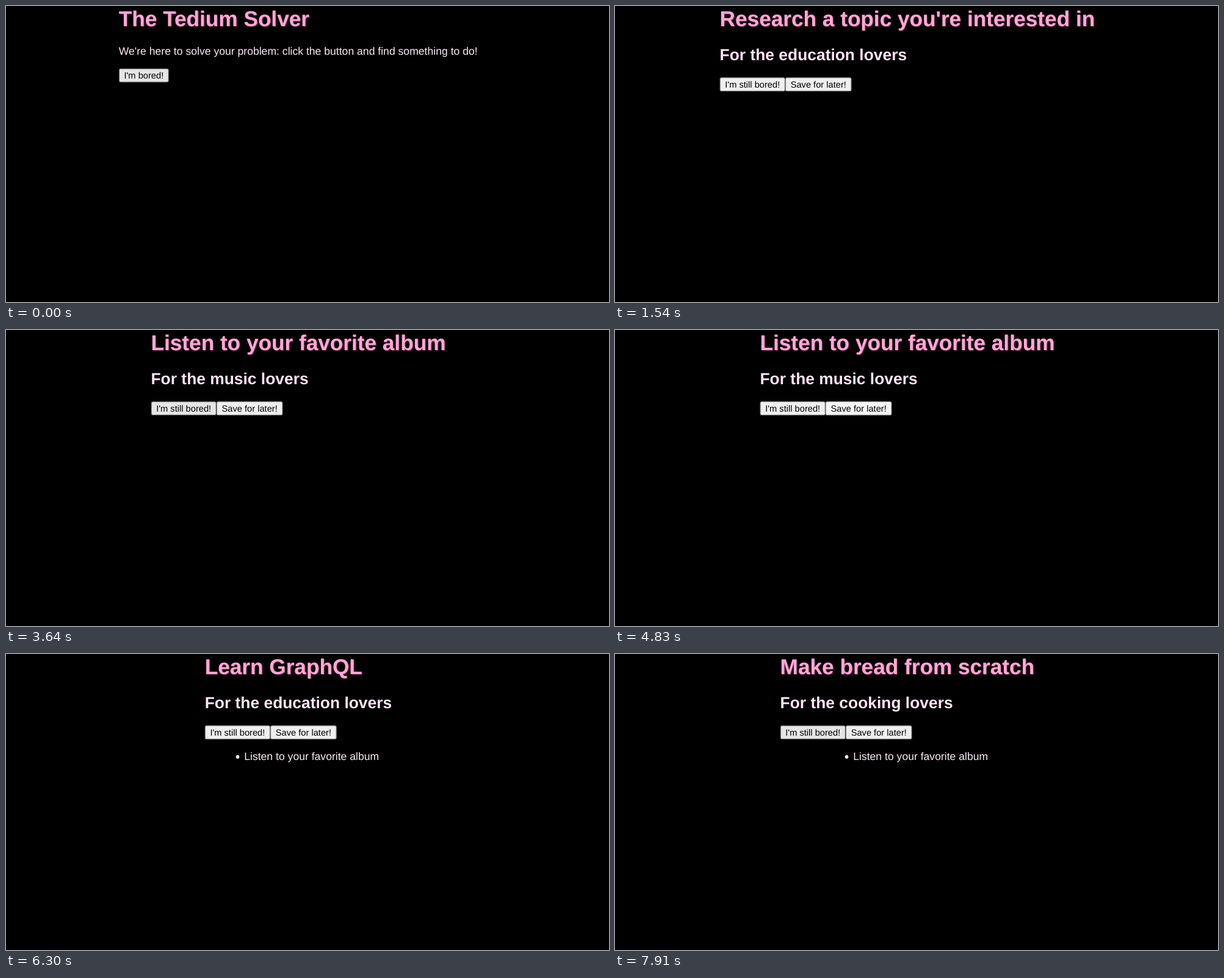
An HTML page that plays this animation: 988 by 486 pixels, repeating every 8 s.

```html
<!DOCTYPE html>
<html lang="en">
<head>
<meta charset="utf-8">
<title>Something to do</title>
<style>
  html, body { margin: 0; width: 100%; height: 100%; overflow: hidden; background: #000; }
  svg { display: block; width: 988px; height: 486px; }
  text { font-family: "Liberation Sans", Arial, sans-serif; text-rendering: geometricPrecision; white-space: pre; }
  .title { font-size: 35.2px; font-weight: bold; fill: #fea8d6; text-shadow: 1px 1px 2px #7a2a55; }
  .subtitle { font-size: 26.4px; font-weight: bold; fill: #ffe4f6; }
  .body { font-size: 17.6px; fill: #ffe9f8; }
  .label { font-size: 14.667px; fill: #000; }
  rect { stroke-width: 1.1px; }
  .normal rect { fill: #efefef; stroke: #767676; }
  .hover rect { fill: #e5e5e5; stroke: #4f4f4f; }
  .active rect { fill: #f5f5f5; stroke: #8d8d8d; }
  .disabled rect { fill: #686868; stroke: #6c6c6c; }
  .disabled .label { fill: #1c1c1c; }
</style>
</head>
<body>
<svg id="stage" viewBox="0 0 988 486"></svg>
<script>
const LOOP = 8000;
const stage = document.getElementById('stage');
const BORED = "I'm still bored!";
const LATER = 'Save for later!';

const screens = {
  home: { x: 184.8, title: 'The Tedium Solver', top: 102.4, buttons: ["I'm bored!"],
    body: "We're here to solve your problem: click the button and find something to do!" },
  research: { x: 171.6, title: "Research a topic you're interested in",
    subtitle: 'For the education lovers', buttons: [BORED, LATER] },
  album: { x: 237.5, title: 'Listen to your favorite album',
    subtitle: 'For the music lovers', buttons: [BORED, LATER] },
  saved: { x: 237.5, title: 'Listen to your favorite album',
    subtitle: 'For the music lovers', buttons: [BORED, 'Saved!'], list: true },
  learn: { x: 325.7, title: 'Learn GraphQL',
    subtitle: 'For the education lovers', buttons: [BORED, LATER], list: true },
  bread: { x: 270.6, title: 'Make bread from scratch',
    subtitle: 'For the cooking lovers', buttons: [BORED, LATER], list: true }
};

// start time, screen, state of each button
const steps = [
  [0, 'home', 'hover'],
  [1260, 'home', 'active'],
  [1400, 'research', 'normal', 'normal'],
  [2240, 'research', 'hover', 'normal'],
  [3430, 'research', 'active', 'normal'],
  [3570, 'album', 'hover', 'normal'],
  [4340, 'album', 'normal', 'hover'],
  [4830, 'album', 'normal', 'active'],
  [4970, 'saved', 'normal', 'disabled'],
  [5530, 'saved', 'hover', 'disabled'],
  [6090, 'saved', 'active', 'disabled'],
  [6230, 'learn', 'normal', 'normal'],
  [6860, 'learn', 'hover', 'normal'],
  [7700, 'learn', 'active', 'normal'],
  [7910, 'bread', 'hover', 'normal']
];

function add(parent, tag, attrs, content = '') {
  const node = document.createElementNS('http://www.w3.org/2000/svg', tag);
  for (const [key, value] of Object.entries(attrs)) node.setAttribute(key, value);
  node.textContent = content;
  return parent.appendChild(node);
}

function write(parent, style, x, y, content) {
  return add(parent, 'text', { class: style, x, y }, content);
}

function addButton(parent, x, top, label, state) {
  const group = add(parent, 'g', { class: state });
  const box = add(group, 'rect', { x: x + 0.55, y: top + 0.55, height: 22, rx: 2.2 });
  const text = write(group, 'label', x + 8.7, top + 16.8, label);
  const width = text.getComputedTextLength() + 17.4;
  box.setAttribute('width', width - 1.1);
  return x + width;
}

function show([, name, ...states]) {
  const { x, title, subtitle, body, top = 117.2, buttons, list } = screens[name];
  stage.replaceChildren();
  write(stage, 'title', x, 33.2, title);
  if (subtitle) write(stage, 'subtitle', x, 89, subtitle);
  if (body) write(stage, 'body', x, 80.3, body);
  let left = x;
  buttons.forEach((label, i) => { left = addButton(stage, left, top, label, states[i]); });
  if (list) {
    add(stage, 'circle', { class: 'body', cx: 379.6, cy: 168.9, r: 2.8 });
    write(stage, 'body', 390.2, 174.2, 'Listen to your favorite album');
  }
}

let shown;
const start = performance.now();

function tick() {
  const time = (performance.now() - start) % LOOP;
  const step = steps.findLast(([from]) => from <= time);
  if (step !== shown) show(shown = step);
  requestAnimationFrame(tick);
}
tick();
</script>
</body>
</html>
```
